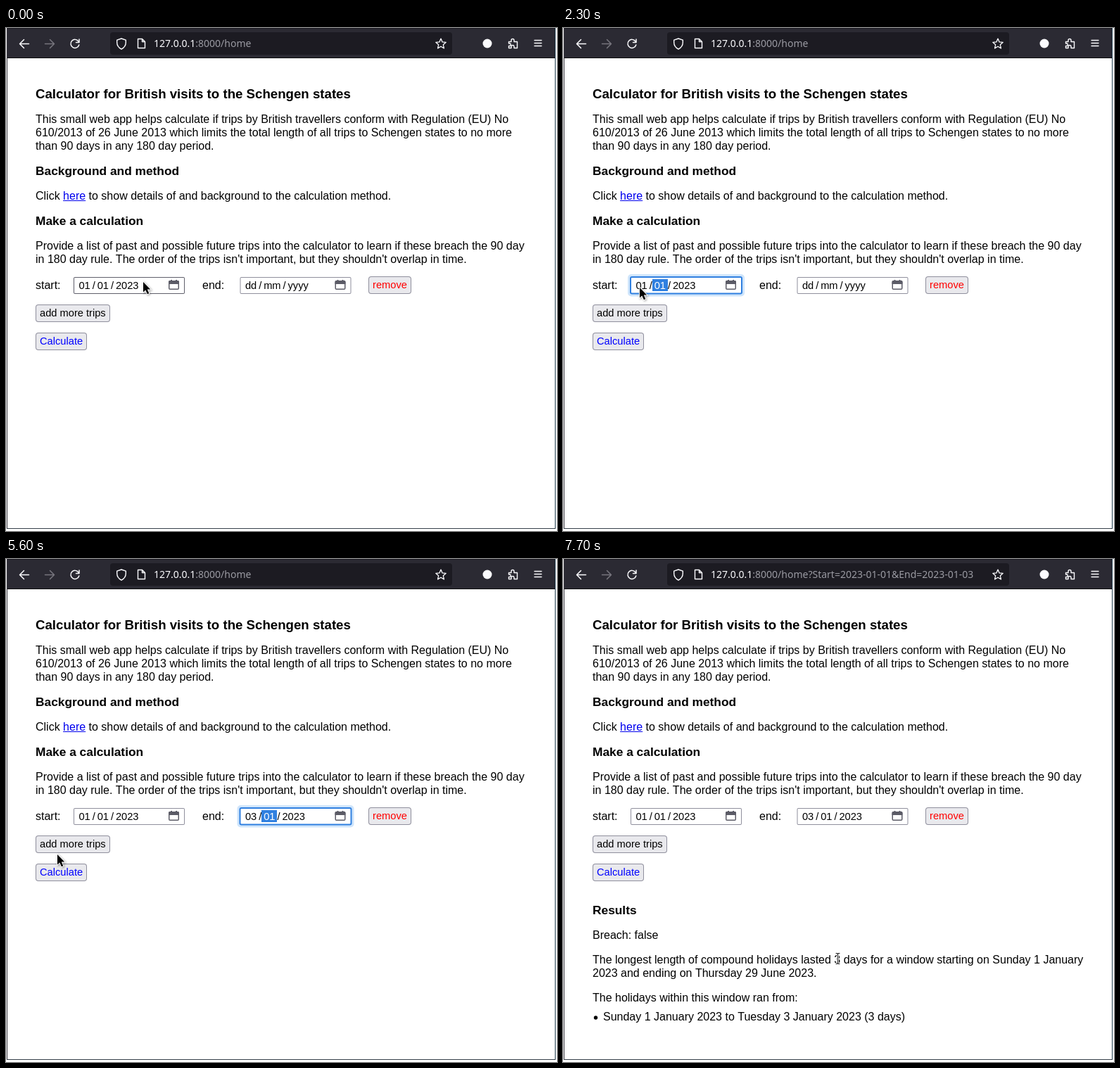
An HTML page with a canvas for the animation above (8 s loop, 783 by 715 pixels).

```html
<!DOCTYPE html>
<html lang="en">
<head>
<meta charset="utf-8">
<title>Trip calculator</title>
<style>
html, body { margin: 0; width: 100%; height: 100%; overflow: hidden; background: #fff; }
canvas { display: block; }
</style>
</head>
<body>
<canvas id="stage" width="783" height="715"></canvas>
<script>
const ctx = document.getElementById('stage').getContext('2d');
const LOOP = 8000;
const SANS = '"Liberation Sans", Arial, sans-serif';
const BODY = '16px ' + SANS;
const FORM = '14.667px ' + SANS;
const HEADING = 'bold 17.333px ' + SANS;
const TITLE = 'bold 18.667px ' + SANS;
const URL_FONT = '14px "Noto Sans", sans-serif';
const BLUE = '#3080e0', HALO = '#cfe5fb', LIGHT = '#fbfbfe';

// Pointer stops: time, x, y; each holds until the next.
const pointerStops = [
  [0, 195, 361], [100, 189, 361], [200, 184, 360], [400, 182, 361],
  [600, 169, 362], [700, 140, 365], [800, 117, 368], [900, 109, 369],
  [5600, 73, 420], [5700, 46, 456], [6000, 51, 453], [6100, 57, 451],
  [6800, 80, 468], [6900, 140, 492], [7000, 225, 520], [7100, 310, 543],
  [7200, 380, 558], [7300, 421, 565], [7600, 402, 567], [7700, 390, 568]
];

const PLACEHOLDER = ['dd', 'mm', 'yyyy'];
const START_DATE = ['01', '01', '2023'];

function rect(x, y, w, h, fill) {
  ctx.fillStyle = fill;
  ctx.fillRect(x, y, w, h);
}

function round(x, y, w, h, r, fill) {
  ctx.beginPath();
  ctx.roundRect(x, y, w, h, r);
  ctx.fillStyle = fill;
  ctx.fill();
}

// A filled box whose border lies inside its bounds.
function bordered(x, y, w, h, r, border, fill, line = 1) {
  round(x, y, w, h, r, border);
  round(x + line, y + line, w - 2 * line, h - 2 * line, Math.max(0, r - line), fill);
}

function text(str, x, y, font = BODY, fill = '#000') {
  ctx.font = font;
  ctx.fillStyle = fill;
  ctx.fillText(str, x, y);
  return ctx.measureText(str).width;
}

function stroke(path, color, width = 1.5) {
  ctx.strokeStyle = color;
  ctx.lineWidth = width;
  ctx.lineCap = ctx.lineJoin = 'round';
  ctx.stroke(new Path2D(path));
}

function starPath(cx, cy, outer, inner) {
  let path = '';
  for (let i = 0; i < 10; i++) {
    const r = i % 2 ? inner : outer, a = i * Math.PI / 5 - Math.PI / 2;
    path += (i ? 'L' : 'M') + (cx + r * Math.cos(a)) + ' ' + (cy + r * Math.sin(a));
  }
  return path + 'Z';
}

function drawToolbar(submitted) {
  rect(1, 0, 780, 42, '#2b2a33');
  rect(1, 0, 780, 1, '#1c1b22');
  rect(1, 42, 780, 1, '#0c0c0d');
  round(148, 6, 486, 32, 4, '#1c1b22');

  stroke('M32.5 22.5H20M25.5 16.5L19.5 22.5L25.5 28.5', LIGHT);
  stroke('M55.5 22.5H68M62.5 16.5L68.5 22.5L62.5 28.5', '#77767e');
  stroke('M103 19A6 6 0 1 0 103.8 24M104 16V20.5H99.5', LIGHT);
  stroke('M164 15L170.3 17.2V20.5C170.3 25 168 28 164 30C160 28 157.7 25 157.7 20.5V17.2Z', LIGHT, 1.4);
  stroke('M187.5 15.5H193.5L197.5 19.5V28.5H187.5ZM193.5 15.5V19.5H197.5', LIGHT, 1.4);
  stroke(starPath(618, 22.7, 7.6, 3.5), LIGHT, 1.3);
  ctx.beginPath();
  ctx.arc(684, 22, 6.5, 0, 7);
  ctx.fillStyle = LIGHT;
  ctx.fill();
  stroke('M714.5 19.5H718V17.5A2 2 0 0 1 722 17.5V19.5H726.5V28.5H722V26.5A2 2 0 0 0 718 26.5V28.5H714.5V25.5H716A1.8 1.8 0 0 0 716 22H714.5Z', LIGHT, 1.4);
  stroke('M751 17.5H761M751 21.5H761M751 25.5H761', LIGHT, 1.3);

  const host = text('127.0.0.1', 210, 27, URL_FONT, LIGHT);
  const query = submitted ? '?Start=2023-01-01&End=2023-01-03' : '';
  text(':8000/home' + query, 210 + host, 27, URL_FONT, '#9a9aa2');
}

function drawIntro() {
  text('Calculator for British visits to the Schengen states', 42, 100, TITLE);
  text('This small web app helps calculate if trips by British travellers conform with Regulation (EU) No', 42, 135);
  text('610/2013 of 26 June 2013 which limits the total length of all trips to Schengen states to no more', 42, 154);
  text('than 90 days in any 180 day period.', 42, 173);
  text('Background and method', 42, 209, HEADING);
  let x = 42 + text('Click ', 42, 244);
  const linkWidth = text('here', x, 244, BODY, '#0000ee');
  rect(x, 245, linkWidth, 1, '#0000ee');
  text(' to show details of and background to the calculation method.', x + linkWidth, 244);
  text('Make a calculation', 42, 280, HEADING);
  text('Provide a list of past and possible future trips into the calculator to learn if these breach the 90 day', 42, 315);
  text("in 180 day rule. The order of the trips isn't important, but they shouldn't overlap in time.", 42, 334);
}

function drawCalendarIcon(x, color) {
  rect(x + 3, 358, 2, 3, color);
  rect(x + 10, 358, 2, 3, color);
  bordered(x, 359, 15, 13, 2, color, '#fff', 1.5);
  round(x, 359, 15, 5, [2, 2, 0, 0], color);
}

// focus: -1 none, 0..2 date part, 3 calendar button
function drawDateInput(x, parts, focus, hovered) {
  if (focus >= 0) {
    round(x - 4, 350, 166, 31.5, 5, HALO);
    bordered(x - 1, 353, 160, 25.5, 3, BLUE, '#fff', 2);
  } else {
    bordered(x, 354, 158, 24, 2, hovered ? '#5f5f6b' : '#8f8f9d', '#fff');
  }
  const pad = 2.93;
  let left = x + 4.5;
  parts.forEach((part, i) => {
    ctx.font = FORM;
    const width = ctx.measureText(part).width + 2 * pad;
    if (focus === i) rect(Math.round(left), 357, Math.round(width), 17, BLUE);
    text(part, left + pad, 370.5, FORM, focus === i ? '#fff' : '#000');
    left += width;
    if (i < 2) left += text('/', left, 370.5, FORM);
  });
  if (focus === 3) bordered(x + 131, 355, 22, 20, 4, BLUE, '#fff', 2);
  drawCalendarIcon(x + 135, focus === 3 ? '#15141a' : '#5b5b66');
}

function drawButton(label, x, y, width, color, state = 0) {
  const border = ['#8f8f9d', '#676774', '#484851'][state];
  const fill = ['#e9e9ed', '#d0d0d7', '#b1b1b9'][state];
  bordered(x, y, width, 25, 4, border, fill);
  text(label, x + 6, y + 17, FORM, color);
}

function startFocus(t) {
  if (t < 1300 || t >= 3800) return -1;
  return t < 2300 ? 0 : t < 2900 ? 1 : t < 3300 ? 2 : 3;
}

function endFocus(t) {
  if (t < 3800 || t >= 6300) return -1;
  return t < 5100 ? 0 : 1;
}

function endDate(t) {
  if (t < 3800) return PLACEHOLDER;
  return [t < 4800 ? '01' : t < 5100 ? '00' : '03', '01', '2023'];
}

function drawForm(t) {
  text('start:', 42, 371);
  drawDateInput(96, START_DATE, startFocus(t), t < 5600);
  text('end:', 279, 371);
  drawDateInput(332.5, endDate(t), endFocus(t), false);
  drawButton('remove', 515, 353, 61, '#f00');
  drawButton('add more trips', 42, 393, 106, '#000');
  const pressed = t >= 6300 && t < 6500;
  const hovered = t >= 5700 && t < 6800;
  drawButton('Calculate', 42, 433, 73, '#00f', pressed ? 2 : hovered ? 1 : 0);
}

function drawResults() {
  text('Results', 42, 505, HEADING);
  text('Breach: false', 42, 540);
  text('The longest length of compound holidays lasted 3 days for a window starting on Sunday 1 January', 42, 575);
  text('2023 and ending on Thursday 29 June 2023.', 42, 594);
  text('The holidays within this window ran from:', 42, 629);
  ctx.beginPath();
  ctx.arc(46.5, 652, 2.7, 0, 7);
  ctx.fill();
  text('Sunday 1 January 2023 to Tuesday 3 January 2023 (3 days)', 57, 656);
}

function drawArrow() {
  const shape = new Path2D('M0 0V14.5L3.3 11.5L5.9 17.3L8.3 16.2L5.8 10.5H10.2Z');
  ctx.shadowColor = 'rgba(0,0,0,.4)';
  ctx.shadowBlur = 3;
  ctx.shadowOffsetX = ctx.shadowOffsetY = 1;
  ctx.lineJoin = 'miter';
  ctx.lineWidth = 1.8;
  ctx.strokeStyle = '#fff';
  ctx.stroke(shape);
  ctx.shadowColor = 'transparent';
  ctx.fillStyle = '#000';
  ctx.fill(shape);
}

function drawBeam() {
  const shape = 'M-2.5 -7.5H-1L0 -6.5L1 -7.5H2.5M0 -6.5V6.5M-2.5 7.5H-1L0 6.5L1 7.5H2.5';
  stroke(shape, '#fff', 3);
  stroke(shape, '#222', 1.1);
}

function drawPointer(t) {
  const [, x, y] = pointerStops.findLast(stop => stop[0] <= t);
  ctx.save();
  if (t >= 7300) {
    ctx.translate(x + 0.5, y);
    drawBeam();
  } else {
    ctx.translate(x, y);
    drawArrow();
  }
  ctx.restore();
}

function draw(t) {
  const submitted = t >= 6500;
  rect(0, 0, 783, 715, '#fff');
  drawToolbar(submitted);
  rect(1, 0, 1, 712, '#36353d');
  rect(780, 0, 1, 712, '#243f50');
  rect(1, 711, 780, 1, '#36404a');
  drawIntro();
  drawForm(t);
  if (submitted) drawResults();
  drawPointer(t);
}

const began = performance.now();
function tick() {
  draw((performance.now() - began) % LOOP);
  requestAnimationFrame(tick);
}
tick();
</script>
</body>
</html>
```
